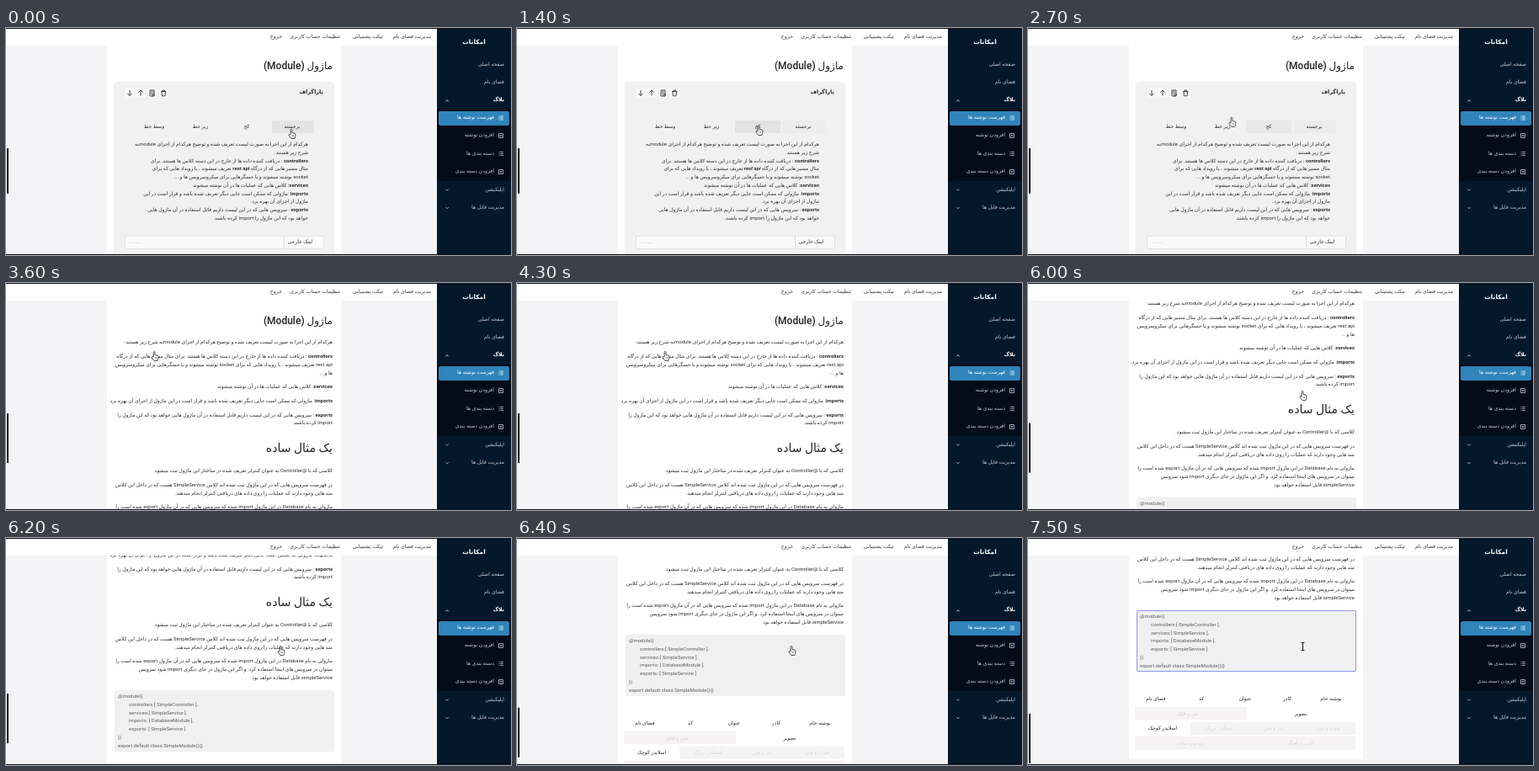
An HTML page that plays this animation: 600 by 270 pixels, repeating every 8 s.

```html
<!DOCTYPE html>
<html lang="fa">
<head>
<meta charset="utf-8">
<title>ویرایش ماژول</title>
<style>
html, body { margin: 0; width: 100%; height: 100%; overflow: hidden; }
body { position: relative; background: #f4f3f5; color: #2b2b2e; font: 6px/9.75px Roboto, "DejaVu Sans", sans-serif; }
#stage { position: absolute; left: 0; top: 0; width: 600px; height: 270px; overflow: hidden; }
#stage * { animation-duration: 8s; animation-iteration-count: infinite; animation-timing-function: linear; }
.box, .t, svg { position: absolute; }

/* --x is the right edge (or centre) and --y the middle of the first line */
.t { right: calc(600px - var(--x) * 1px); top: calc(var(--y) * 1px - 4.9px); margin: 0; white-space: nowrap; direction: rtl; }
.c { right: auto; left: calc(var(--x) * 1px); transform: translateX(-50%); }
.code { right: auto; left: 133px; direction: ltr; white-space: pre; color: #5c5c60; tab-size: 13px; }
h2.t { font-size: 12px; font-weight: 500; color: #222; }
.icon { fill: none; stroke: #333; stroke-width: .9; }

#page, #editor, #view { position: absolute; left: 0; top: 0; width: 600px; height: 478px; }
#page { animation-name: scroll; }
#editor { animation-name: editing; }
#view { animation-name: viewing; }
#editor, #view, #api, #hand, #beam { animation-timing-function: step-end !important; }
.column { left: 120px; top: 0; width: 278px; height: 478px; background: #fff; }
.card { left: 129px; top: 65px; width: 260px; height: 240px; border-radius: 3px; background: #f2f1f2; box-shadow: 0 0 3px #d9d8da; }
.tool { top: 71px; width: 12px; height: 12px; border-radius: 2px; background: #f8f7f8; }
.key { top: 110px; height: 15px; border-radius: 1px; }
#save { animation-name: save; }
#bold { animation-name: bold; }
#slant { animation-name: slant; }
#api { animation-name: italic; }
.select { left: 141px; top: 247px; width: 235px; height: 14px; border: .5px solid #e4e3e5; border-radius: 2px; background: #fafafa; }
#code { left: 128.5px; top: 301px; width: 259px; height: 71px; border: 1px solid #efeeef; border-radius: 2px; background: #f1f0f1; animation-name: focus; }
.off { background: #f5f3f4; }
.dim { color: #d8d4d6; }

#thumb { left: 1px; top: 0; width: 2px; background: #111; animation-name: thumb; }
.bar { left: 0; top: 0; width: 512px; height: 21px; background: #fff; }
.top { font-size: 6.2px; color: #3a3a3d; }
.side { left: 512px; top: 0; width: 88px; height: 270px; background: #04182c; }
.sub { left: 512px; top: 97px; width: 88px; height: 85px; background: #020d19; }
.on { left: 514px; top: 99px; width: 84px; height: 17px; border-radius: 2px; background: #2f84bb; }
.menu { color: #c3cad1; font-size: 6.2px; }
.menu b, .menu.lit { color: #fff; }
.side-icons { left: 0; top: 0; fill: none; stroke: #c3cad1; stroke-width: .8; }
.edge { left: 0; width: 600px; height: 1px; background: #151518; }

#cursor { left: 0; top: 0; width: 0; height: 0; animation-name: move; }
#cursor svg { left: -5px; top: -6px; }
#hand { animation-name: hand; }
#beam { animation-name: beam; }

@keyframes move {
  0%, 1.25% { transform: translate(340px, 126px); animation-timing-function: ease-in-out; }
  6.9% { transform: translate(288px, 122px); }
  31% { transform: translate(288px, 122px); animation-timing-function: ease-in; }
  33.75% { transform: translate(243px, 112px); animation-timing-function: ease-out; }
  41%, 62% { transform: translate(177px, 87px); animation-timing-function: ease-in; }
  68.75% { transform: translate(282px, 100px); animation-timing-function: ease-out; }
  71.5%, 100% { transform: translate(327px, 134px); }
}
@keyframes hand { 0% { opacity: 1; } 86.25%, 100% { opacity: 0; } }
@keyframes beam { 0% { opacity: 0; } 86.25%, 100% { opacity: 1; } }
@keyframes bold { 0%, 2.5% { background: #e5e4e5; } 6.5%, 100% { background: #edeced; } }
@keyframes slant {
  0%, 4.5% { background: #e6e5e600; }
  7%, 10% { background: #eae9ea; }
  13%, 31% { background: #e3e2e3; }
  33.5%, 100% { background: #e9e8e9; }
}
@keyframes italic { 0% { font-style: normal; } 12.5% { font-style: italic; } 21.25%, 100% { font-style: normal; } }
@keyframes save { 0%, 39% { background: #f8f7f8; } 41%, 100% { background: #e6e5e7; } }
@keyframes editing { 0% { visibility: visible; } 43.1%, 100% { visibility: hidden; } }
@keyframes viewing { 0% { visibility: hidden; } 43.1%, 100% { visibility: visible; } }
@keyframes scroll {
  0%, 71.25% { transform: none; animation-timing-function: ease-in-out; }
  83%, 100% { transform: translateY(-215px); }
}
@keyframes thumb {
  0% { height: 54px; transform: translateY(143px); animation-timing-function: step-end; }
  43.1%, 71.25% { height: 59px; transform: translateY(155px); animation-timing-function: ease-in-out; }
  83%, 100% { height: 59px; transform: translateY(209px); }
}
@keyframes focus { 0%, 86.25% { border-color: #efeeef; } 90%, 100% { border-color: #8f93f0; } }
</style>
</head>
<body>
<div id="stage">
  <div id="page">
    <div class="box column"></div>
    <h2 class="t" style="--x:388;--y:46">ماژول (Module)</h2>

    <div id="editor">
      <div class="box card"></div>
      <b class="t" style="--x:377;--y:77;font-size:6.5px">پاراگراف</b>
      <div class="box tool" style="left:141px"></div>
      <div class="box tool" style="left:154px"></div>
      <div class="box tool" id="save" style="left:167.5px"></div>
      <div class="box tool" style="left:181px"></div>
      <svg class="icon" style="left:0;top:0" width="400" height="270">
        <path d="M147 74v6.5m-2.5-2.5 2.5 2.5 2.5-2.5M160 80.500v-6.500m-2.500 2.500 2.500-2.500 2.500 2.500"/>
        <path d="M171 74h5v7h-5zM172 76h3M172 78h1.500"/><circle cx="175" cy="79.500" r="1.300"/>
        <path d="M184 75.500h6.500M186 75.500v-1.500h2.500v1.500M185 75.500l.4 5.300h3.700l.4-5.300"/>
        <path d="m367.500 253.500 1.700 1.700 1.700-1.700" stroke="#aaa"/>
      </svg>
      <div class="box key" id="bold" style="left:316px;width:50px"></div>
      <div class="box key" id="slant" style="left:259px;width:54px"></div>
      <span class="t c" style="--x:340;--y:117">برجسته</span>
      <span class="t c" style="--x:286;--y:117">کج</span>
      <span class="t c" style="--x:231;--y:117">زیر خط</span>
      <span class="t c" style="--x:176;--y:117">وسط خط</span>
      <p class="t" style="--x:359;--y:138">هرکدام از این اجزا به صورت لیست تعریف شده و توضیح هرکدام از اجزای moduleبه<br>
        شرح زیر هستند.<br>
        <b>controllers</b> : دریافت کننده داده ها از خارج در این دسته کلاس ها هستند. برای<br>
        مثال مسیر هایی که از درگاه <b id="api">rest api</b> تعریف میشوند ، یا رویداد هایی که برای<br>
        socket نوشته میشوند و یا حسگرهایی برای میکروسرویس ها و ...<br>
        <b>services</b>: کلاس هایی که عملیات ها در آن نوشته میشوند<br>
        <b>imports</b>: ماژولی که ممکن است جایی دیگر تعریف شده باشد و قرار است در این<br>
        ماژول از اجزای آن بهره برد.<br>
        <b>exports</b> : سرویس هایی که در این لیست داریم قابل استفاده در آن ماژول هایی<br>
        خواهد بود که این ماژول را import کرده باشند.</p>
      <div class="box select"></div>
      <div class="box" style="left:330px;top:247px;width:.5px;height:15px;background:#dddcde"></div>
      <span class="t" style="--x:364;--y:254">لینک خارجی</span>
      <span class="t" style="--x:161;--y:254;color:#aaa">.........</span>
    </div>

    <div id="view">
      <p class="t" style="--x:388;--y:70">هرکدام از این اجزا به صورت لیست تعریف شده و توضیح هرکدام از اجزای moduleبه شرح زیر هستند:</p>
      <p class="t" style="--x:388;--y:87"><b>controllers</b> : دریافت کننده داده ها از خارج در این دسته کلاس ها هستند. برای مثال مسیر هایی که از درگاه<br>
        rest api تعریف میشوند ، یا رویداد هایی که برای socket نوشته میشوند و یا حسگرهایی برای میکروسرویس<br>
        ها و ...</p>
      <p class="t" style="--x:388;--y:123"><b>services</b>: کلاس هایی که عملیات ها در آن نوشته میشوند</p>
      <p class="t" style="--x:388;--y:140"><b>imports</b>: ماژولی که ممکن است جایی دیگر تعریف شده باشد و قرار است در این ماژول از اجزای آن بهره برد.</p>
      <p class="t" style="--x:388;--y:156.500"><b>exports</b> : سرویس هایی که در این لیست داریم قابل استفاده در آن ماژول هایی خواهد بود که این ماژول را<br>
        import کرده باشند.</p>
      <h2 class="t" style="--x:388;--y:197;font-size:14px">یک مثال ساده</h2>
      <p class="t" style="--x:388;--y:222.500">کلاسی که با @Controller به عنوان کنترلر تعریف شده در ساختار این ماژول ثبت میشود.</p>
      <p class="t" style="--x:388;--y:240">در فهرست سرویس هایی که در این ماژول ثبت شده اند کلاس SimpleService هست که در داخل این کلاس<br>
        متد هایی وجود دارند که عملیات را روی داده های دریافتی کنترلر انجام میدهند.</p>
      <p class="t" style="--x:388;--y:266">ماژولی به نام Database در این ماژول import شده که سرویس هایی که در آن ماژول export شده است را<br>
        میتوان در سرویس های اینجا استفاده کرد. و اگر این ماژول در جای دیگری import شود سرویس<br>
        simpleService قابل استفاده خواهد بود</p>
      <div class="box" id="code"></div>
      <p class="t code" style="--y:308">@module({
	controllers:[ SimpleController ],
	services:[ SimpleService ],
	imports: [ DatabaseModule ],
	exports: [ SimpleService ]
})
export default class SimpleModule(){}</p>
      <span class="t c" style="--x:360;--y:406">نوشته خام</span>
      <span class="t c" style="--x:308;--y:406">کادر</span>
      <span class="t c" style="--x:258;--y:406">عنوان</span>
      <span class="t c" style="--x:206;--y:406">کد</span>
      <span class="t c" style="--x:152;--y:406">فضای نام</span>
      <div class="box off" style="left:127px;top:416px;width:133px;height:15px"></div>
      <div class="box off" style="left:193px;top:434px;width:196px;height:15px"></div>
      <div class="box off" style="left:127px;top:451px;width:262px;height:16px"></div>
      <span class="t c" style="--x:324;--y:424">تصویر</span>
      <span class="t c dim" style="--x:190;--y:424">متن و فایل</span>
      <span class="t c dim" style="--x:357;--y:441">صوت و متن</span>
      <span class="t c dim" style="--x:292;--y:441">تیتر و متن</span>
      <span class="t c dim" style="--x:227;--y:441">اسلایدر بزرگ</span>
      <span class="t c" style="--x:160;--y:441">اسلایدر کوچک</span>
      <span class="t c dim" style="--x:324;--y:459">کاربری آهنگ</span>
      <span class="t c dim" style="--x:193;--y:459">ویدیوی ساده</span>
    </div>
  </div>

  <div class="box" id="thumb"></div>
  <div class="box bar"></div>
  <span class="t top" style="--x:505;--y:11">مدیریت فضای نام</span>
  <span class="t top" style="--x:448;--y:11">تیکت پشتیبانی</span>
  <span class="t top" style="--x:397;--y:11">تنظیمات حساب کاربری</span>
  <span class="t top" style="--x:328;--y:11">خروج</span>

  <div class="box side"></div>
  <div class="box sub"></div>
  <div class="box on"></div>
  <b class="t c menu lit" style="--x:556;--y:17;font-size:7.500px">امکانات</b>
  <span class="t menu" style="--x:592;--y:44">صفحه اصلی</span>
  <span class="t menu" style="--x:592;--y:65">فضای نام</span>
  <span class="t menu" style="--x:592;--y:86"><b>بلاگ</b></span>
  <span class="t menu lit" style="--x:580;--y:107">فهرست نوشته ها</span>
  <span class="t menu" style="--x:580;--y:128">افزودن نوشته</span>
  <span class="t menu" style="--x:580;--y:149.500">دسته بندی ها</span>
  <span class="t menu" style="--x:580;--y:171">افزودن دسته بندی</span>
  <span class="t menu" style="--x:592;--y:192.500">اپلیکیشن</span>
  <span class="t menu" style="--x:592;--y:214">مدیریت فایل ها</span>
  <svg class="side-icons" width="600" height="270">
    <defs>
      <path id="list" d="M-2.500-2h1M-2.500 0h1M-2.500 2h1M-.8-2h3.600M-.8 0h3.600M-.8 2h3.600"/>
      <path id="add" d="M-2.500-2.500h5v5h-5zM-1.300 0h2.600M0-1.300v2.600"/>
      <path id="down" d="m-1.700-.8 1.700 1.700 1.700-1.700"/>
    </defs>
    <use href="#list" x="588" y="107" stroke="#fff"/>
    <use href="#add" x="588" y="128"/>
    <use href="#list" x="588" y="149.500"/>
    <use href="#add" x="588" y="171"/>
    <use href="#down" transform="translate(524 86.500) scale(1 -1)" stroke="#fff"/>
    <use href="#down" x="524" y="192.500"/>
    <use href="#down" x="524" y="214"/>
  </svg>
  <div class="box edge" style="top:0"></div>
  <div class="box edge" style="top:269px"></div>

  <div class="box" id="cursor">
    <svg id="hand" width="10" height="12">
      <path d="M3.200 6.800V1.400a.9.9 0 0 1 1.800 0v3.200l3 .7q1.200.3 1 1.600l-.5 2.600-.6 2H4L1 7.700q-.4-1 .6-1.100z" fill="#fff" stroke="#222" stroke-width=".8"/>
      <path d="M5 9V7M6.500 9V7" stroke="#222" stroke-width=".5"/>
    </svg>
    <svg id="beam" width="10" height="12" style="top:-11px">
      <path d="M2.500 1.500h4M4.500 1.500v9M2.500 10.500h4" fill="none" stroke="#222" stroke-width="1.100"/>
    </svg>
  </div>
</div>
</body>
</html>
```
